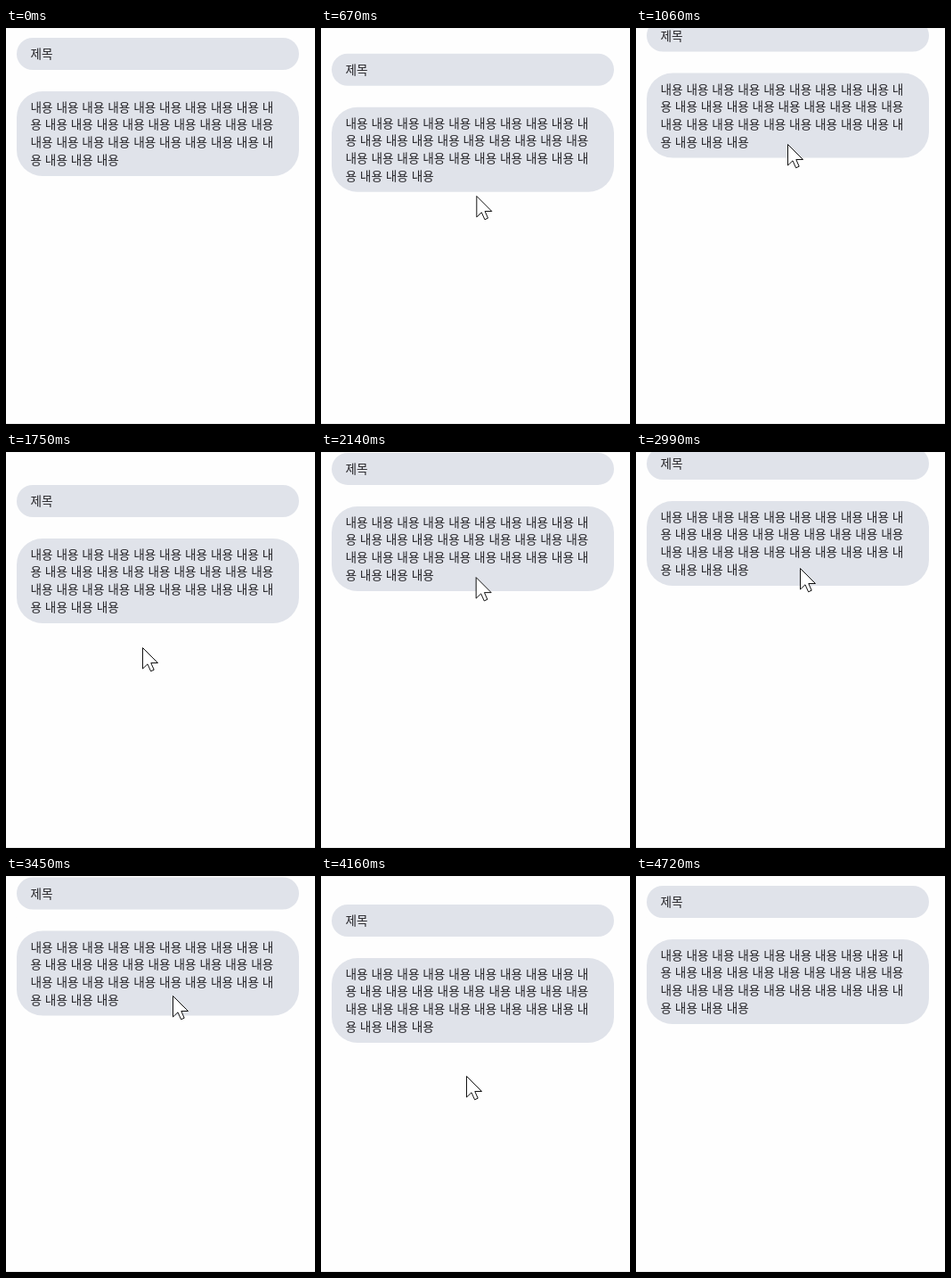
An HTML page for the animation above (7420 ms loop, 347 by 444 pixels).

```html
<!DOCTYPE html>
<html lang="ko">
<head>
<meta charset="utf-8">
<style>
  html, body { margin: 0; width: 100%; height: 100%; overflow: hidden; background: #fefefe; }
  #stage {
    position: relative; width: 347px; height: 444px; overflow: hidden; background: #fefefe;
    box-shadow: inset 0 1px #f8f8f8, inset 0 -1px #ececec;
  }
  #list {
    position: absolute; left: 11.5px; top: 11px; width: 317px;
    font: 300 13.65px/19.85px "Noto Sans CJK KR", "Noto Sans CJK", "Noto Sans CJK JP", sans-serif;
    color: #242327;
  }
  .card { padding: 7.5px 16px 8.5px; background: #e0e3ea; white-space: nowrap; }
  .title { height: 20px; border-radius: 18px; }
  .body { margin-top: 24px; border-radius: 29px; }
  svg { position: absolute; left: 0; top: 0; overflow: visible; }
  #disc { filter: drop-shadow(0 1px 1.5px rgba(0, 0, 0, .3)); }
</style>
</head>
<body>
<div id="stage">
  <div id="list">
    <div class="card title">제목</div>
    <div class="card body">내용 내용 내용 내용 내용 내용 내용 내용 내용 내<br>용 내용 내용 내용 내용 내용 내용 내용 내용 내용<br>내용 내용 내용 내용 내용 내용 내용 내용 내용 내<br>용 내용 내용 내용</div>
  </div>
  <svg width="347" height="444">
    <g id="spinner">
      <circle id="disc" r="20" fill="#fafafa"/>
      <path id="arc" d="M3.5 -7.4A8.2 8.2 0 0 1 8.2 0" fill="none" stroke="#a9a9ad" stroke-width="1.6"/>
    </g>
    <path id="cursor" d="M.5 .5V24L6 18.8L9.6 26.8L13.2 25.2L9.8 17.5H17.5Z" fill="#fff" stroke="#111"/>
  </svg>
</div>
<script>
const LOOP = 7420, FIRST = 52, STEP = 77; // ms; the screen refreshes once per STEP
const LEAVE = 57; // step at which the cursor goes
const el = id => document.getElementById(id);
const list = el("list"), spinner = el("spinner"), arc = el("arc"), cursor = el("cursor");

// Turning points of the drag.
const poses = [
  { step: 0, x: 200, y: 352, scroll: 0 },
  { step: 5, x: 176, y: 150, scroll: -16 },
  { step: 9, x: 174, y: 195, scroll: 24 },
  { step: 13, x: 170, y: 130, scroll: -20.5 },
  { step: 22, x: 153, y: 219, scroll: 26 },
  { step: 26, x: 172, y: 135, scroll: -16 },
  { step: 31, x: 188, y: 184, scroll: 41.5 },
  { step: 38, x: 184, y: 130, scroll: -16 },
  { step: 44, x: 187, y: 134, scroll: -9.5 },
  { step: 53, x: 163, y: 224, scroll: 21 },
  { step: 59, x: 166, y: 236, scroll: 0 },
];

function poseAt(step) {
  const i = poses.findIndex(p => p.step > step);
  if (i < 1) return i ? poses.at(-1) : poses[0];
  const a = poses[i - 1], b = poses[i];
  const u = (step - a.step) / (b.step - a.step), ease = u * u * (3 - 2 * u);
  const mix = key => a[key] + (b[key] - a[key]) * ease;
  return { x: mix("x"), y: mix("y"), scroll: mix("scroll") };
}

const start = performance.now();

function draw() {
  const now = (performance.now() - start) % LOOP;
  const step = Math.floor((now - FIRST) / STEP);
  const { x, y, scroll } = poseAt(step);
  const pull = scroll - 41.5;
  list.style.transform = `translateY(${scroll}px)`;
  spinner.setAttribute("transform", `translate(170.5 ${Math.max(-30, 11 + pull * 2.5)})`);
  arc.setAttribute("transform", `rotate(${pull * 5})`);
  cursor.setAttribute("transform", `translate(${x} ${y})`);
  cursor.style.display = step >= 0 && step < LEAVE ? "" : "none";
  requestAnimationFrame(draw);
}
draw();
</script>
</body>
</html>
```
